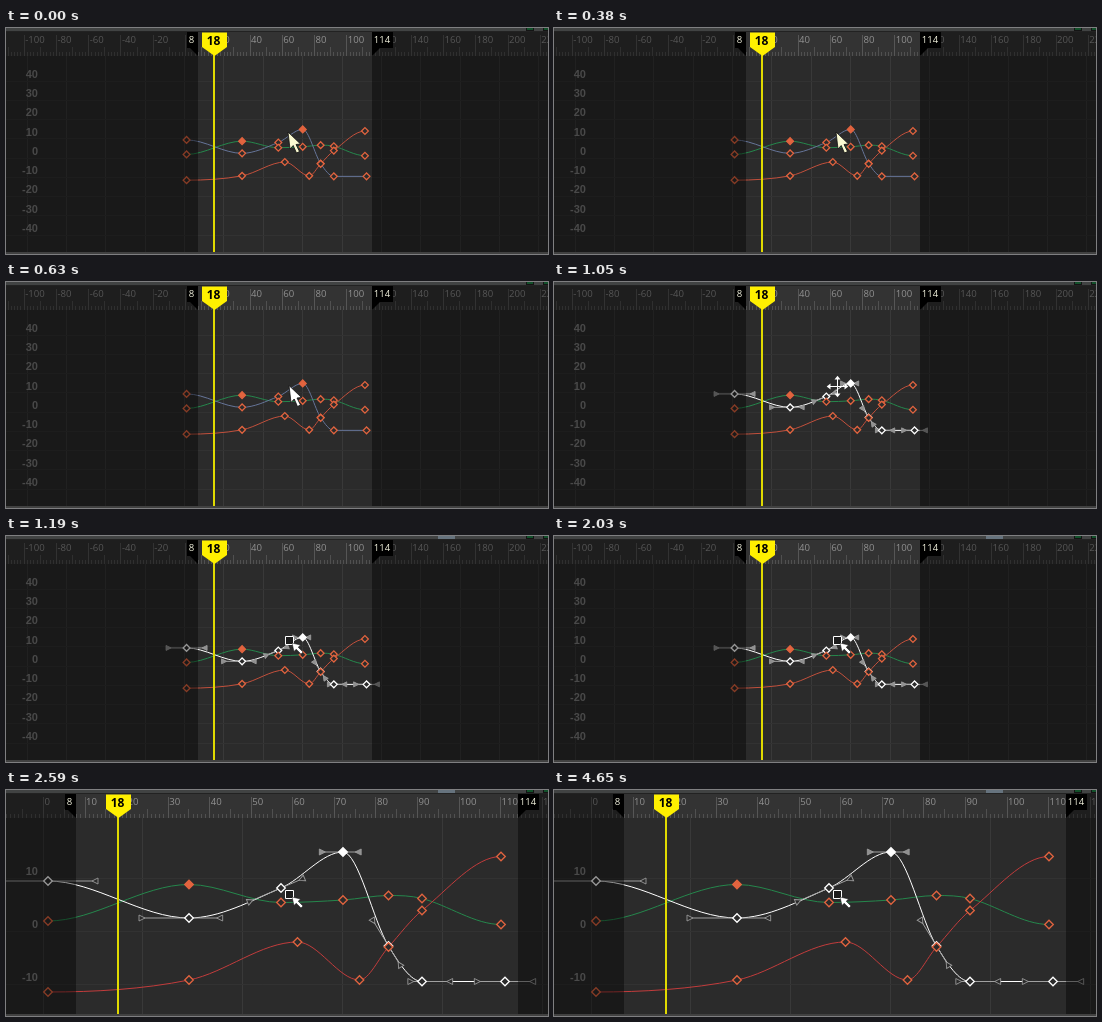
An HTML page that plays this animation: 542x226 px, repeating every 6020 ms.

```html
<!DOCTYPE html>
<html lang="en">
<head>
<meta charset="utf-8">
<title>Curve editor</title>
<style>
html, body { margin: 0; width: 100%; height: 100%; overflow: hidden; background: #1a1a1a; }
svg { display: block; width: 542px; height: 226px; }
text { font-family: "Open Sans", "Noto Sans", sans-serif; font-size: 9.6px; fill: #929292; }
.value { font: bold 11px "Liberation Sans", Arial, sans-serif; fill: #7c7c7c; text-anchor: end; }
.now { font: bold 12px "Open Sans", "Noto Sans", sans-serif; fill: #000; text-anchor: middle; }
.limit { fill: #f0f0dc; text-anchor: middle; }
path { fill: none; }

/* Hard cuts at 630, 1050, 1190 and 2590 ms of 6020 ms */
.hover, .nudge, .drag, .pick, .far, .near, .plain, .chosen { animation: 6020ms step-end infinite; }
.hover { animation-name: hover; }
.nudge { animation-name: nudge; }
.plain { animation-name: plain; }
.chosen { animation-name: chosen; }
.drag { animation-name: drag; }
.pick { animation-name: pick; }
.far { animation-name: far; }
.near { animation-name: near; }
@keyframes hover { 0% { opacity: 1 } 10.4651%, 100% { opacity: 0 } }
@keyframes nudge { 0% { opacity: 0 } 10.4651% { opacity: 1 } 17.4419%, 100% { opacity: 0 } }
@keyframes plain { 0% { opacity: 1 } 17.4419%, 100% { opacity: 0 } }
@keyframes chosen { 0% { opacity: 0 } 17.4419%, 100% { opacity: 1 } }
@keyframes drag { 0% { opacity: 0 } 17.4419% { opacity: 1 } 19.7674%, 100% { opacity: 0 } }
@keyframes pick { 0% { opacity: 0 } 19.7674%, 100% { opacity: 1 } }
@keyframes far { 0% { opacity: 1 } 43.0233%, 100% { opacity: 0 } }
@keyframes near { 0% { opacity: 0 } 43.0233%, 100% { opacity: 1 } }
</style>
</head>
<body>
<svg id="stage" viewBox="0 0 542 226"></svg>
<script>
const W = 542, RULER = 28, FLOOR = 224;
const ORANGE = '#e2643f';

// Keys in the coordinates of the close view
const blue = [[42, 91], [183, 128], [275, 98], [337, 62], [382.5, 156], [416, 191.5], [499, 191.5]];
const green = [[42, 131], [183, 94.5], [275, 112.5], [337, 110], [382.5, 105.5], [416, 108.5], [495, 134.5]];
const red = [[42, 202], [183, 190], [291.5, 152], [353.5, 190], [382.5, 157], [416, 120.5], [495, 66.5]];

// x0, kx: origin and scale of the graph; rx, rk: the same for the ruler
const near = { cls: 'near', x0: 37, kx: 4.165, rx: 37.5, rk: 4.155, zero: 141.4, ky: 5.3, step: 10, minor: 1, r: 4.3, red: '#c23c3c' };
const far = { cls: 'far', x0: 178.6, kx: 1.64, rx: 179.5, rk: 1.613, zero: 130.2, ky: 1.922, step: 20, minor: 2, r: 3.4, red: '#c2503c' };

const rect = (x, y, w, h, fill) => `<rect x="${x}" y="${y}" width="${w}" height="${h}" fill="${fill}"/>`;
const line = (x1, y1, x2, y2, color) =>
  `<path d="M${x1} ${y1}L${x2} ${y2}" stroke="${color}"/>`;
const label = (x, y, s, cls = '') => `<text x="${x}" y="${y}" class="${cls}">${s}</text>`;
const poly = (points, fill, extra = '') => `<polygon points="${points}" fill="${fill}" ${extra}/>`;
const group = (cls, body) => `<g class="${cls}">${body}</g>`;
const snap = v => Math.floor(v) + 0.5;

// Calls draw(frame, x) for each multiple of step on the stage
function across(x0, k, step, draw) {
  let s = '';
  for (let f = Math.ceil(-x0 / k / step) * step; x0 + k * f < W; f += step) s += draw(f, x0 + k * f);
  return s;
}

// Flat at extremes and ends, neighbour slope elsewhere
function slope(keys, i) {
  const a = keys[i - 1], b = keys[i], c = keys[i + 1];
  if (!a || !c || (b[1] - a[1]) * (c[1] - b[1]) <= 0) return 0;
  return (c[1] - a[1]) / (c[0] - a[0]);
}

// Handles reach a third of the way to the next key
function handle(keys, i, side) {
  const k = keys[i], next = keys[i + side] || [k[0] + side * (i ? 83 : 141), 0];
  const dx = (next[0] - k[0]) / 3;
  return [k[0] + dx, k[1] + dx * slope(keys, i)];
}

function curve(keys, map, color) {
  let d = 'M' + map(keys[0]);
  for (let i = 1; i < keys.length; i++)
    d += `C${map(handle(keys, i - 1, 1))} ${map(handle(keys, i, -1))} ${map(keys[i])}`;
  return `<path d="${d}" stroke="${color}"/>`;
}

function diamonds(keys, map, r, color, full) {
  return keys.map((k, i) => {
    const [x, y] = map(k);
    return poly(`${x - r},${y} ${x},${y - r} ${x + r},${y} ${x},${y + r}`,
      i === full ? color : '#2b2b2b', `stroke="${color}" stroke-width="1.3"`);
  }).join('');
}

function handles(keys, map, small) {
  let out = '';
  keys.forEach((k, i) => [-1, 1].forEach(side => {
    const [x, y] = map(k);
    const [hx, hy] = map(handle(keys, i, side));
    const turn = Math.atan2(y - hy, x - hx) * 180 / Math.PI;
    const fill = small || i === 3 ? '#909090' : '#2b2b2b';
    out += line(x, y, hx, hy, '#a0a0a0') +
      `<g transform="translate(${hx} ${hy}) rotate(${turn})">` +
      poly(small ? '-2,-2.5 3,0 -2,2.5' : '-3,-3 3,0 -3,3', fill, 'stroke="#9a9a9a" stroke-width="0.9"') + '</g>';
  }));
  return out;
}

function drawView(v) {
  const small = v === far;
  const X = f => v.x0 + v.kx * f;
  const map = ([x, y]) => [
    v.x0 + (x - near.x0) * v.kx / near.kx,
    v.zero + (y - near.zero) * v.ky / near.ky
  ];
  let s = rect(0, 4, W, FLOOR - 4, '#2b2b2b') + rect(0, 4, W, RULER - 4, '#333');

  s += across(v.x0, v.kx, 24, (f, x) => line(snap(x), RULER, snap(x), FLOOR, '#393939'));
  for (let n = -40; n <= 40; n += 10) {
    const y = v.zero - n * v.ky;
    if (y < 45 || y > FLOOR) continue;
    s += line(0, snap(y), W, snap(y), '#323232') + label(32, y - 3.3, n, 'value');
  }

  s += across(v.rx, v.rk, v.minor, (f, x) => {
    const top = f % v.step === 0 ? 7 : f % (v.step / 2) === 0 ? 19 : 24;
    return line(snap(x), top, snap(x), RULER, top < 10 ? '#565656' : '#505050');
  });
  s += across(v.rx, v.rk, v.step, (f, x) => label(x + 1, 15, f));

  s += curve(green, map, '#25874c') + curve(red, map, v.red);
  const plain = curve(blue, map, '#667599') + diamonds(blue, map, v.r, ORANGE, 3);
  const chosen = curve(blue, map, '#fff') + handles(blue, map, small) + diamonds(blue, map, v.r, '#fff', 3);
  s += small ? group('plain', plain) + group('chosen', chosen) : chosen;
  s += diamonds(green, map, v.r, ORANGE, 1) + diamonds(red, map, v.r, ORANGE);

  // Shade outside the playback range
  const a = Math.round(X(8)), b = Math.round(X(114)), shade = 'rgba(0,0,0,.41)';
  s += rect(0, 4, a, FLOOR - 4, shade) + rect(b, 4, W - b, FLOOR - 4, shade);
  s += poly(`${a - 11},4 ${a},4 ${a},28 ${a - 8},20 ${a - 11},20`, '#000') + label(a - 6.5, 15, 8, 'limit');
  s += poly(`${b},4 ${b + 21},4 ${b + 21},20 ${b + 8},20 ${b},28`, '#000') + label(b + 10, 15, 114, 'limit');

  const t = Math.round(X(18));
  s += rect(t - 1, 20, 2, FLOOR - 20, '#e0da00');
  s += poly(`${t - 12},4.5 ${t + 13},4.5 ${t + 13},19 ${t + 0.5},28 ${t - 12},19`, '#fff000');
  s += label(t - 0.5, 16.5, 18, 'now');
  return group(v.cls, s);
}

const arrow = (x, y, fill) => `<g transform="translate(${x} ${y})">` +
  poly('0,0 2,17 5.2,13.5 8.5,21 11.5,19.5 8,12.5 12.5,12', fill, 'stroke="#111" stroke-width="0.8"') + '</g>';

function moveCursor(x, y) {
  let s = '';
  for (let a = 0; a < 360; a += 90)
    s += `<g transform="translate(${x} ${y}) rotate(${a})">` +
      line(0, 0, 9, 0, '#fff') + poly('7,-3 10.8,0 7,3', '#fff') + '</g>';
  return s;
}

const pickCursor =
  rect(279, 100, 9, 9, '#1c1c1c') +
  '<path d="M279.5 100.5H287.5V108.5H279.5Z" stroke="#fff"/>' +
  poly('286,107 294.5,109 292.2,111.2 297,116 295,118 290.2,113.2 288,115.5', '#fff', 'stroke="#111" stroke-width="0.5"');

const lamp = x => rect(x, 0, 8, 3, '#141414') + rect(x + 1, 0, 6, 2, '#12502a');

document.getElementById('stage').innerHTML =
  rect(0, 0, W, 226, '#1a1a1a') +
  drawView(far) + drawView(near) +
  rect(0, 0, W, 3, '#414343') + rect(0, 3, W, 1, '#222') +
  lamp(520) + lamp(537) +
  rect(0, FLOOR, W, 2, '#414141') +
  group('pick', rect(432, 0, 17, 3, '#66737e')) +
  group('hover', arrow(282, 104, '#fafad2')) +
  group('nudge', arrow(283, 103.5, '#fff')) +
  group('drag', moveCursor(283.5, 104.5)) +
  group('pick', pickCursor);
</script>
</body>
</html>
```
